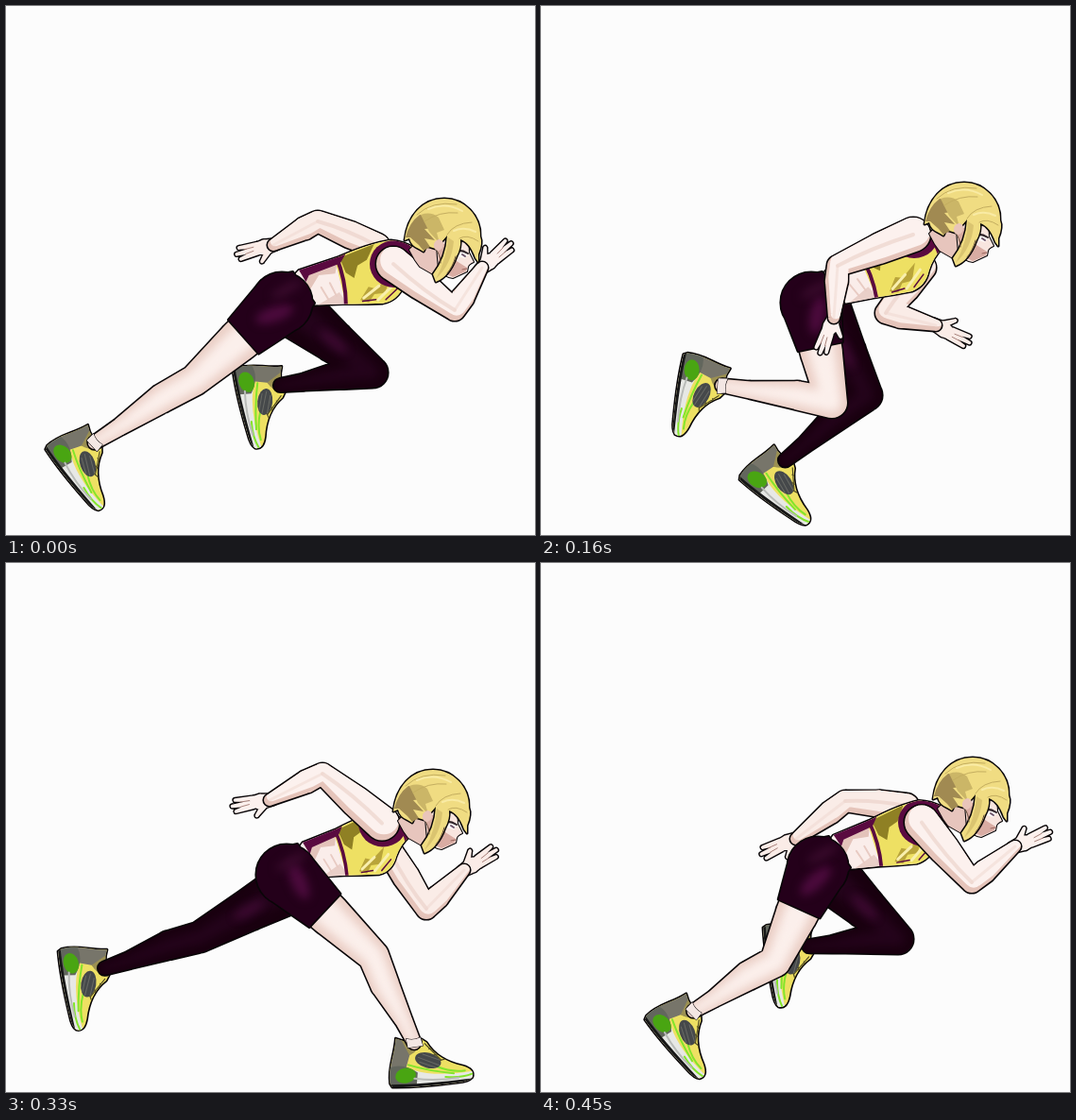
Write an HTML page with a canvas that moves like this. It is 560 by 560 pixels and loops after 0.5 s.

```html
<!DOCTYPE html>
<html lang="en">
<head>
<meta charset="utf-8">
<title>Sprint cycle</title>
<style>
  html, body { margin: 0; width: 100%; height: 100%; overflow: hidden; background: #fcfcfc; }
  canvas { display: block; width: 560px; height: 560px; }
</style>
</head>
<body>
<canvas id="stage" width="560" height="560"></canvas>
<script>
const ctx = document.getElementById('stage').getContext('2d');
const INK = '#080507', MAROON = '#5a0a40', YELLOW = '#eee063';

// Joint positions (x, y) for the twelve poses of one stride.
const hips = [292,314, 290,316, 292,321, 295,325, 286,314, 282,312,
              285,322, 291,327, 297,330, 293,333, 288,333, 293,322];
const heads = [463,204, 461,206, 458,207, 454,203, 447,187, 442,193,
               445,204, 448,213, 451,219, 446,219, 440,216, 456,206];
const near = {
  knee: [200,396, 203,402, 212,405, 227,419, 308,420, 338,402,
         367,400, 384,402, 389,416, 370,417, 343,412, 248,422],
  heel: [42,468, 38,445, 48,420, 58,416, 152,368, 203,346,
         185,380, 276,521, 408,554, 300,549, 207,505, 110,482],
  foot: [51, 66, 79, 83, 98, 104, 78, 35, -5, 4, 36, 49],
  elbow: [475,322, 478,336, 470,350, 348,331, 314,275, 305,224,
          325,213, 331,217, 335,223, 318,230, 304,238, 456,338],
  wrist: [504,277, 507,288, 503,302, 402,350, 310,330, 258,270,
          268,245, 274,247, 279,251, 278,272, 283,296, 502,300]
};
const far = {
  knee: [388,388, 403,393, 390,408, 368,418, 345,412, 264,418,
         215,392, 208,394, 205,396, 228,415, 345,420, 378,398],
  heel: [241,385, 296,512, 405,550, 291,545, 210,500, 118,468,
         66,445, 57,428, 56,410, 62,408, 187,393, 236,385],
  foot: [76, 35, -5, 3, 36, 54, 70, 75, 79, 84, 95, 81],
  elbow: [330,228, 328,234, 322,247, 316,274, 365,325, 421,330,
          447,336, 447,350, 445,366, 400,370, 350,342, 322,252],
  wrist: [283,253, 275,258, 272,285, 315,310, 418,338, 469,302,
          488,300, 488,312, 485,325, 450,355, 400,362, 270,292]
};

const at = (track, i) => ({ x: track[2 * i], y: track[2 * i + 1] });
const add = (p, x, y) => ({ x: p.x + x, y: p.y + y });
const mix = (a, b, t) => ({ x: a.x + (b.x - a.x) * t, y: a.y + (b.y - a.y) * t });
const angle = (a, b) => Math.atan2(b.y - a.y, b.x - a.x);
function polar(p, along, across, a) {
  const c = Math.cos(a), s = Math.sin(a);
  return { x: p.x + along * c - across * s, y: p.y + along * s + across * c };
}

// Union of tapered segments through [point, radius] nodes.
function chain(nodes, scale = 1, dx = 0, dy = 0, roundEnd = true) {
  const path = new Path2D();
  nodes.forEach(([p, radius], i) => {
    const r = radius * scale, x = p.x + dx, y = p.y + dy;
    const next = nodes[i + 1];
    if (next || roundEnd) {
      path.moveTo(x + r, y);
      path.arc(x, y, r, 0, 7);
    }
    if (!next) return;
    const a = angle(p, next[0]), s = Math.sin(a), c = -Math.cos(a);
    const r2 = next[1] * scale, x2 = next[0].x + dx, y2 = next[0].y + dy;
    path.moveTo(x + s * r, y + c * r);
    path.lineTo(x2 + s * r2, y2 + c * r2);
    path.lineTo(x2 - s * r2, y2 - c * r2);
    path.lineTo(x - s * r, y - c * r);
    path.closePath();
  });
  return path;
}

function fill(path, color) {
  ctx.fillStyle = color;
  ctx.fill(typeof path === 'string' ? new Path2D(path) : path);
}
function line(path, color, width) {
  ctx.strokeStyle = color;
  ctx.lineWidth = width;
  ctx.stroke(typeof path === 'string' ? new Path2D(path) : path);
}
function inked(path, color, width = 3.2) {
  const p = typeof path === 'string' ? new Path2D(path) : path;
  line(p, INK, width);
  fill(p, color);
}
function local(p, a, draw) {
  ctx.save();
  ctx.translate(p.x, p.y);
  ctx.rotate(a);
  draw();
  ctx.restore();
}
function oval(x, y, rx, ry, a, color) {
  const p = new Path2D();
  p.ellipse(x, y, rx, ry, a, 0, 7);
  fill(p, color);
}
function shaded(nodes, base, light, scale, dx, dy, blur) {
  const path = chain(nodes);
  inked(path, base);
  ctx.save();
  ctx.clip(path);
  if (blur) ctx.filter = `blur(${blur}px)`;
  fill(chain(nodes, scale, dx, dy), light);
  ctx.restore();
}

function shoe(heel, a) {
  local(heel, a, () => {
    const body = new Path2D('M-1-3C-2-21 6-31 9-50Q22-43 36-47L41-43C48-29 61-20 77-15Q90-10 86-2Q82 2 70 2C48 3 20 3 1 1Z');
    inked(body, YELLOW);
    ctx.save();
    ctx.clip(body);
    fill('M-4 0L8-52L38-48Q28-36 22-31L16-15Z', '#77756a');
    fill('M15-47L39-48Q33-35 22-31Z', '#9b9052');
    fill('M25-15Q50-5 90-9V4H0V-12Z', '#e7e8e5');
    fill('M-4-18Q12-26 29-12L27 0H-4Z', '#62665d');
    oval(16, -10, 11, 8, -.1, '#49a512');
    line('M20-21Q40-13 67-8M58-5Q74-2 87-6M49-17Q65-9 79-10', '#83e52b', 2);
    line('M25-6Q48-1 72-3', '#b9bbb8', 2);
    line('M-2 0Q28 3 86 1', '#171717', 4);
    oval(41, -24, 14, 8, .35, '#45484a');
    line('M31-28L52-18M36-31L54-23M32-23L48-16', '#686a65', 1);
    line('M39-42L55-23M43-36L49-37M48-29L54-30M54-23L60-24', '#554f24', 1.2);
    ctx.restore();
  });
}

function legNodes(hip, knee, heel, footAngle, hipRadius) {
  const ankle = polar(heel, 28, -44, footAngle);
  const calf = polar(mix(knee, ankle, .32), 0, 2, angle(knee, ankle));
  return [[hip, hipRadius], [mix(hip, knee, .5), 22], [knee, 16], [calf, 15],
          [mix(knee, ankle, .75), 9], [ankle, 7]];
}

function farLeg(hip, i) {
  const foot = far.foot[i] * Math.PI / 180, heel = at(far.heel, i);
  shoe(heel, foot);
  const nodes = legNodes(add(hip, 13, 8), at(far.knee, i), heel, foot, 29);
  shaded(nodes, '#19000f', '#24031b', .45, 0, 0, 5);
  const [thigh, knee] = [nodes[1][0], nodes[2][0]];
  ctx.save();
  ctx.filter = 'blur(4px)';
  oval(thigh.x, thigh.y, 18, 5, angle(thigh, knee), '#3c0930');
  ctx.restore();
}

function nearLeg(hip, i) {
  const foot = near.foot[i] * Math.PI / 180;
  const heel = at(near.heel, i), knee = at(near.knee, i);
  shoe(heel, foot);
  shaded(legNodes(hip, knee, heel, foot, 25), '#ebcfc6', '#fbefeb', .62, 0, 0, 5);
  const ankle = polar(heel, 27, -45, foot);
  local(ankle, foot, () => inked('M-7-4Q0-1 8-4L10 5L-6 6Z', '#f3e7e4', 1));

  const waist = add(hip, 23, -16), hem = mix(hip, knee, .44);
  const pelvis = chain([[hip, 32], [waist, 20]], 1, 0, 0, false);
  pelvis.addPath(chain([[hip, 32], [hem, 24]], 1, 0, 0, false));
  inked(pelvis, '#24001a');
  ctx.save();
  ctx.clip(pelvis);
  ctx.filter = 'blur(5px)';
  const a = angle(hip, hem);
  const glow = polar(hip, 14, -4, a);
  oval(glow.x, glow.y, 21, 8, a + .4, '#4c0a3d');
  oval(hip.x + 5, hip.y - 14, 18, 5, -.5, '#390a2c');
  ctx.restore();
}

function hand(wrist, a, color) {
  local(wrist, a, () => {
    const o = (x, y) => ({ x, y });
    const shape = chain([[o(-3, 0), 6], [o(10, 0), 8], [o(18, 1), 6]]);
    const finger = (x1, y1, x2, y2) =>
      shape.addPath(chain([[o(x1, y1), 3.3], [o(x2, y2), 1.8]]));
    finger(7, -5, 16, -14);
    finger(18, -3, 37, -6);
    finger(18, 0, 40, 0);
    finger(17, 4, 36, 6);
    inked(shape, color, 2.8);
    line('M22-1L31-2M21 3L31 3', '#9d746c', .8);
  });
}

function arm(shoulder, elbow, wrist, isNear) {
  const light = isNear ? '#fcf1ee' : '#faece7';
  const nodes = [[shoulder, isNear ? 18 : 13], [mix(shoulder, elbow, .45), isNear ? 16 : 14],
    [elbow, 11], [mix(elbow, wrist, .3), 12], [wrist, 6]];
  hand(wrist, angle(elbow, wrist) + (isNear ? .3 : .24), light);
  shaded(nodes, '#e5c4ba', light, .88, 2, -4, 0);
  const [s, e, w] = [shoulder, elbow, wrist].map(p => `${p.x} ${p.y}`);
  const crease = polar(mix(shoulder, elbow, .55), 0, 4, angle(shoulder, elbow));
  ctx.save();
  ctx.clip(chain(nodes));
  ctx.globalAlpha = .5;
  line(`M${s}Q${crease.x} ${crease.y} ${e}`, '#e8c9c0', 4);
  line(`M${e}L${w}`, '#efd7cf', 3);
  ctx.restore();
}

function torso(waist, neck, shoulder) {
  ctx.save();
  ctx.translate(waist.x, waist.y);
  ctx.rotate(angle(waist, neck));
  ctx.scale(Math.hypot(neck.x - waist.x, neck.y - waist.y) / 121, 1);
  const body = new Path2D('M0-19L44-21Q80-26 102-23Q115-18 124-8L126 11Q112 16 102 27Q92 40 76 39Q55 34 35 28L6 21L-8 12V-14Z');
  inked(body, '#faedea');
  ctx.clip(body);
  fill('M2-15L42-17L36-5L19-8L6 4Z', '#e3c3ba');
  fill('M9 22L35 15L40 30Z', '#e9cfc8');
  line('M18 5L22 20M28 3L31 18', '#e8cbc3', 2);
  fill('M40-23Q80-28 102-25L120-16L128 6L122 14L102 30Q92 42 76 41L38 31Z', YELLOW);
  fill('M45-20L84-24L72-10L61-7L54 5L47-3Z', '#8f8024');
  fill('M54 29L66 18L73 22L92 13L81 29L70 27L62 34Z', '#b9a43a');
  line('M58 28L77 20M72 34L94 22', '#f9efad', 3);
  line('M56 31L70 33M80 36L95 28', MAROON, 1.5);
  fill('M0-20L53-23L44-14L9-11L4-5Z', MAROON);
  line('M42-22Q45 5 38 30', MAROON, 4);
  line('M107-24Q124-8 121 16', MAROON, 6);
  ctx.setTransform(1, 0, 0, 1, 0, 0);
  oval(shoulder.x + 1, shoulder.y, 26, 25, 0, MAROON);
  ctx.restore();
}

function head(p) {
  local(p, 0, () => {
    inked('M-36 54L-20 38L2 60L-2 81L-11 80L-25 72L-30 65Z', '#e7c5bd', 2);
    inked('M-8 38L26 40L27 57L32 67Q27 69 26 72L25 77L10 84Q1 83-5 74Z', '#f8e5df', 2.2);
    fill('M-7 45L9 51L14 66L25 73L24 77L10 83L-4 76Z', '#d9aca3');
    fill('M14 54L27 57L23 63L15 61Z', '#fffafa');
    line('M12 56Q18 53 26 58', '#30242a', 2);
    line('M20 59L23 61', '#6c5369', 2);
    line('M20 75L25 74', '#9a655d', 1);
    inked('M1 0C-22 0-38 18-41 44L-36 42Q-34 50-26 53L-21 56L-18 50L-8 53L4 39Q3 62-11 80L-8 88Q6 83 14 61Q19 52 18 43Q28 46 34 63L37 67L37 59Q42 47 39 40C40 18 22 0 1 0Z', '#f0dc82', 3);
    fill('M-40 41Q-36 25-25 17L-16 18L-10 31L-20 32L-9 44L-20 42L-14 51L-21 55L-26 49L-35 41Z', '#a18a52');
    fill('M-24 17Q-13 13-5 20L1 33L-7 36L-4 47L-15 35Z', '#cbb667');
    fill('M5 41L11 45Q9 69-8 85Q4 63 5 41Z', '#dac470');
    line('M-28 17Q-12 2 14 6M4 38Q11 26 30 25M-20 24Q-4 13 15 15M17 42Q25 37 37 45', '#c4ae60', 1);
    line('M-16 11Q2 3 20 13M11 34Q22 29 34 35', '#f9eba4', 2);
    line('M-9 52Q-3 59-3 68M13 61Q10 72 4 79', '#624b38', 1);
    oval(-5, 49, 5, 6, .4, '#e9c5ba');
  });
}

function drawPose(i) {
  ctx.fillStyle = '#fcfcfc';
  ctx.fillRect(0, 0, 560, 560);
  const hip = at(hips, i), top = at(heads, i);
  const elbow = at(near.elbow, i);
  const twist = Math.max(-1, Math.min(1, (elbow.x - 390) / 70));
  const shoulder = add(top, -53, 62 + 7 * twist);
  const farShoulder = add(top, -56 - 14 * twist, 70 - 20 * twist);

  arm(farShoulder, at(far.elbow, i), at(far.wrist, i), false);
  farLeg(hip, i);
  torso(add(hip, 23, -16), add(top, -31, 61), shoulder);
  nearLeg(hip, i);
  arm(shoulder, elbow, at(near.wrist, i), true);
  head(top);
}

// Each half stride holds five poses for 40 ms and a sixth for 50 ms.
function frame(now) {
  const t = now % 500;
  const half = Math.floor(t / 250);
  drawPose(half * 6 + Math.min(5, Math.floor((t % 250) / 40)));
  requestAnimationFrame(frame);
}
ctx.lineJoin = ctx.lineCap = 'round';
drawPose(0);
requestAnimationFrame(frame);
</script>
</body>
</html>
```
